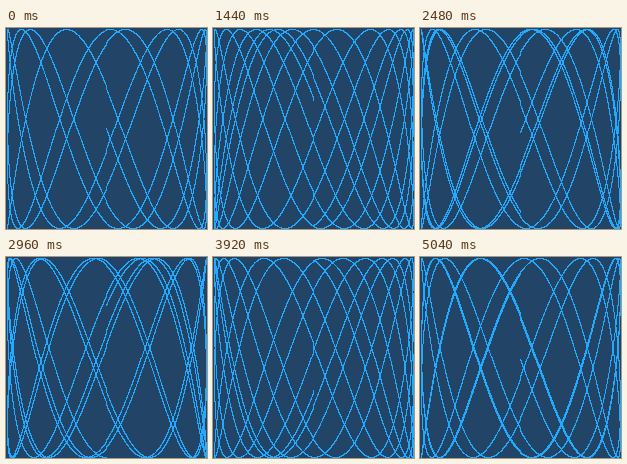
An HTML page with a canvas that plays this animation: 201x201 px, repeating every 5120 ms.

```html
<!DOCTYPE html>
<html lang="en">
<head>
<meta charset="utf-8">
<title>Lissajous</title>
<style>
  html, body { margin: 0; width: 100%; height: 100%; overflow: hidden; background: #224466; }
  canvas { display: block; width: 201px; height: 201px; image-rendering: pixelated; }
</style>
</head>
<body>
<canvas id="stage" width="201" height="201"></canvas>
<script>
const RADIUS = 100, SIZE = 2 * RADIUS + 1;
const CYCLES = 5, RESOLUTION = 0.001, FREQUENCY = 41 / 15;
const STEPS = 64, STEP_MS = 80, PHASE_STEP = 0.1;

const ctx = document.getElementById('stage').getContext('2d');
ctx.fillStyle = '#224466';
const LINE = '#22aaff';

// Rounds toward the centre on the negative side.
const toPixel = v => RADIUS + Math.trunc(v * RADIUS + 0.5);

function draw(phase) {
  ctx.fillStyle = '#224466';
  ctx.fillRect(0, 0, SIZE, SIZE);
  ctx.fillStyle = LINE;
  let lastX = -1, lastY = -1;
  for (let t = 0; t < CYCLES * 2 * Math.PI; t += RESOLUTION) {
    const x = toPixel(Math.sin(t));
    const y = toPixel(Math.sin(t * FREQUENCY + phase));
    if (x === lastX && y === lastY) continue;
    ctx.fillRect(x, y, 1, 1);
    lastX = x;
    lastY = y;
  }
}

let shown = 0;
const start = performance.now();
draw(0);

function tick() {
  const step = Math.floor((performance.now() - start) / STEP_MS) % STEPS;
  if (step !== shown) draw(step * PHASE_STEP);
  shown = step;
  requestAnimationFrame(tick);
}
requestAnimationFrame(tick);
</script>
</body>
</html>
```
